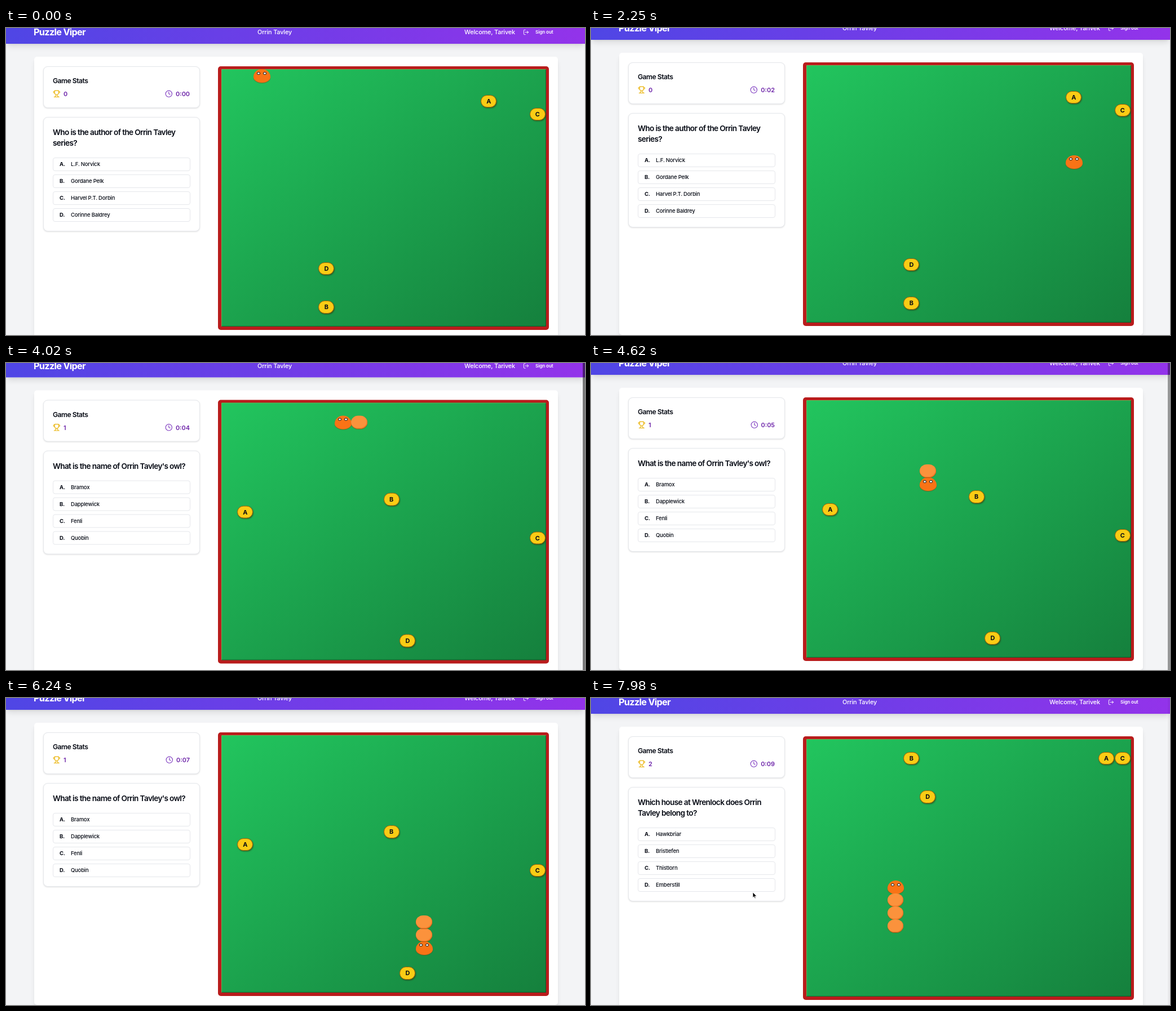
Animation of 1027x545 px, one loop 8000 ms. Source, as an HTML page:

```html
<!DOCTYPE html>
<html lang="en">
<head>
<meta charset="utf-8">
<title>Quiz game</title>
<style>
  * { box-sizing: border-box; }
  html, body { margin: 0; width: 100%; height: 100%; overflow: hidden; background: #f3f4f6; }
  body { position: relative; font: 500 9.5px/20px Inter, sans-serif; color: #060a14; }
  svg { display: block; fill: none; stroke: currentColor; stroke-width: 2; stroke-linecap: round; stroke-linejoin: round; }
  #page { position: absolute; left: 0; top: 0; width: 1027px; height: 552px; }
  #page > *, #field > *, header > * { position: absolute; white-space: nowrap; }

  header { left: 0; top: -20px; width: 1027px; height: 48.4px; color: #fff;
    background: linear-gradient(90deg, #4f46e5, #9333ea);
    box-shadow: 0 7px 10px -2px rgba(0,0,0,.1), 0 3px 4px -3px rgba(0,0,0,.1); }
  header > * { top: 17px; font-size: 10.9px; letter-spacing: -.015em; }
  header .brand { left: 49px; font-size: 16.3px; font-weight: 700; letter-spacing: -.043em; }
  header .out { left: 939px; font-size: 8.2px; font-weight: 600; }

  .panel { left: 49.5px; top: 51px; width: 929.5px; height: 500.5px; border-radius: 5px; background: #fff;
    box-shadow: 0 7px 10px -2px rgba(0,0,0,.1), 0 2px 4px -2px rgba(0,0,0,.1); }
  .card { left: 66px; width: 277.5px; border: 1px solid #e5e7eb; border-radius: 8px; background: #fff;
    box-shadow: 0 1px 2.5px rgba(0,0,0,.12); }
  .stats { top: 67.5px; height: 74.5px; }
  .heading { left: 83px; top: 84px; font-size: 12.2px; font-weight: 600; letter-spacing: -.043em; }
  .number { top: 107px; display: flex; align-items: center; gap: 5.4px; color: #6b21a8;
    font-size: 10.9px; font-weight: 600; }
  .number svg { width: 13.6px; height: 13.6px; }
  .score { left: 83px; }
  .timer { right: 701px; }

  .quiz { top: 158px; padding: 17.2px 16px 15.8px; }
  #question { margin-bottom: 15.8px; font-size: 13.6px; line-height: 19px; font-weight: 600; letter-spacing: -.046em; }
  .option { height: 24.5px; margin-top: 5.4px; padding-left: 11px; border: 1px solid #e5e7eb; border-radius: 4px;
    display: flex; align-items: center; letter-spacing: -.022em; }
  #question + .option { margin-top: 0; }
  .option b { width: 20px; }

  #field { left: 381.5px; top: 73px; width: 576px; height: 457px; border-radius: 1px;
    background: linear-gradient(to bottom right, #22c55e, #15803d);
    box-shadow: inset 1px 1px 0 rgba(150,190,90,.55), inset -1px -1px 1px rgba(0,40,10,.45); }
  .wall { left: 376px; top: 67.5px; width: 587px; height: 468px; border-radius: 5px; background: #b91c1c; }
  .food { width: 28.2px; height: 22.6px; border: 1px solid #a16207; border-radius: 11.3px;
    background: #facc15; box-shadow: 1px 1.5px 2px rgba(60,40,0,.5);
    font-size: 10.9px; font-weight: 700; line-height: 20.6px; text-align: center; }
  .part { width: 28.8px; height: 22.85px; border-radius: 44% / 50%; background: #fb923c;
    box-shadow: 0 1px 1px rgba(170,75,10,.75), inset -1px -1px 1px rgba(234,88,12,.5); }
  .head { width: 29.5px; height: 24px; border-radius: 50% / 58% 58% 42% 42%; background: #f97316;
    box-shadow: 0 1px 1px rgba(150,60,10,.6); }
  .head i { position: absolute; top: 4.5px; left: 6px; width: 6px; height: 5px; border: 1px solid #222;
    border-radius: 50%; background: #fff; }
  .head i + i { left: 17px; }

  #bar { position: absolute; right: 0; top: 0; width: 4.5px; height: 545px; background: rgba(0,0,0,.5); }
  #cursor { position: absolute; left: 286px; top: 344px; width: 9px; height: 13px; }
</style>
</head>
<body>
<div id="page">
  <div class="panel"></div>
  <header>
    <div class="brand">Puzzle Viper</div>
    <div style="left:446px">Orrin Tavley</div>
    <div style="left:813px">Welcome, Tarivek</div>
    <svg style="left:916.5px;top:21.5px" width="11" height="11" viewBox="0 0 24 24"><path d="M9 21H5a2 2 0 0 1-2-2V5a2 2 0 0 1 2-2h4M16 17l5-5-5-5M21 12H9"/></svg>
    <div class="out">Sign out</div>
  </header>
  <div class="card stats"></div>
  <div class="heading">Game Stats</div>
  <div class="number score">
    <svg viewBox="0 0 24 24" color="#eab308"><path d="M6 9H4.500a2.500 2.500 0 0 1 0-5H6M18 9h1.500a2.500 2.500 0 0 0 0-5H18M4 22h16M10 14.700V17c0 2-3 1-3 5M14 14.700V17c0 2 3 1 3 5M18 2H6v7a6 6 0 0 0 12 0Z"/></svg>
    <span id="score"></span>
  </div>
  <div class="number timer">
    <svg viewBox="0 0 24 24" color="#7e3bc0"><circle cx="12" cy="12" r="10"/><path d="M12 6v6l4 2"/></svg>
    <span id="timer"></span>
  </div>
  <div class="card quiz" id="quiz"></div>
  <div class="wall"></div>
  <div id="field"></div>
</div>
<div id="bar"></div>
<svg id="cursor" viewBox="0 0 9 13"><path d="M1 1v9.500l2.200-2 1.500 3.500 1.500-.7-1.500-3.300h3z" fill="#000" stroke="#fff" stroke-width=".8"/></svg>

<script>
const LOOP = 8000, CELL_W = 28.8, CELL_H = 22.85, PAGE_SCROLL = 7;
const $ = id => document.getElementById(id);

// from: when the question appears; cells: column and row of A to D
const rounds = [
  { from: 0, lines: ["Who is the author of the Orrin Tavley", "series?"],
    options: ["L.F. Norvick", "Gordane Pelk", "Harvel P.T. Dorbin", "Corinne Baldrey"],
    cells: [[16, 2], [6, 18], [19, 3], [6, 15]] },
  { from: 2855, lines: ["What is the name of Orrin Tavley's owl?"],
    options: ["Bramox", "Dapplewick", "Fenli", "Quobin"],
    cells: [[1, 8], [10, 7], [19, 10], [11, 18]] },
  { from: 6600, lines: ["Which house at Wrenlock does Orrin", "Tavley belong to?"],
    options: ["Hawkbriar", "Bristlefen", "Thistlorn", "Emberstill"],
    cells: [[18, 1], [6, 1], [19, 1], [7, 4]] }
];

// first move, interval, number of moves, dx, dy
const legs = [
  [30, 100, 7, 1, 0], [900, 0, 1, 1, 0], [1030, 105, 7, 0, 1], [1770, 95, 6, 1, 0],
  [2415, 110, 6, 0, -1], [3098, 115, 9, -1, 0], [4140, 110, 10, 0, 1], [5248, 90, 5, 1, 0],
  [5760, 115, 7, 0, 1], [6600, 104, 7, -1, 0], [7350, 100, 7, 0, -1]
];
const path = [{ t: 0, x: 2, y: 0 }];
for (const [start, gap, count, dx, dy] of legs)
  for (let i = 0; i < count; i++) {
    const { x, y } = path[path.length - 1];
    path.push({ t: start + i * gap, x: x + dx, y: y + dy });
  }

const growth = [0, 2855, 5340, 7300];
const scrolls = [[905, 1], [2310, 0], [3992, 1], [7270, 0]];

const add = (className, html = "") => {
  const el = document.createElement("div");
  el.className = className;
  el.innerHTML = html;
  return $("field").appendChild(el);
};
const place = (el, x, y) => {
  el.style.left = x * CELL_W + "px";
  el.style.top = y * CELL_H + "px";
};
const clamp = v => Math.min(1, Math.max(0, v));
const latest = (list, t, time) => list.reduce((found, item, i) => time(item) <= t ? i : found, -1);

const foods = [..."ABCD"].map(letter => add("food", letter));
const snake = growth.map((_, i) => i ? add("part") : add("part head", "<i></i><i></i>"));
let shown = -1;

function showRound(index) {
  if (index === shown) return;
  shown = index;
  const { lines, options, cells } = rounds[index];
  $("quiz").innerHTML = `<div id="question">${lines.join("<br>")}</div>` +
    options.map((text, i) => `<div class="option"><b>${"ABCD"[i]}.</b>${text}</div>`).join("");
  cells.forEach(([x, y], i) => place(foods[i], x, y));
  $("score").textContent = index;
}

function showScroll(t) {
  const i = latest(scrolls, t, s => s[0]);
  let offset = 0, opacity = 0;
  if (i >= 0) {
    const [start, down] = scrolls[i], age = t - start;
    const eased = 1 - (1 - clamp(age / 150)) ** 2;
    offset = PAGE_SCROLL * (down ? eased : 1 - eased);
    opacity = clamp((720 - age) / 120);
  }
  $("page").style.transform = `translateY(${-offset}px)`;
  $("bar").style.opacity = opacity;
}

function render(t) {
  showRound(latest(rounds, t, r => r.from));
  showScroll(t);
  $("timer").textContent = "0:0" + Math.floor((t + 507) / 937);
  const head = latest(path, t, p => p.t);
  snake.forEach((el, i) => {
    const cell = path[head - i], visible = cell && t >= growth[i];
    el.style.display = visible ? "" : "none";
    if (visible) place(el, cell.x, cell.y);
  });
  $("cursor").style.display = t >= 6600 ? "" : "none";
}

const begin = performance.now();
function tick() {
  render((performance.now() - begin) % LOOP);
  requestAnimationFrame(tick);
}
tick();
</script>
</body>
</html>
```
